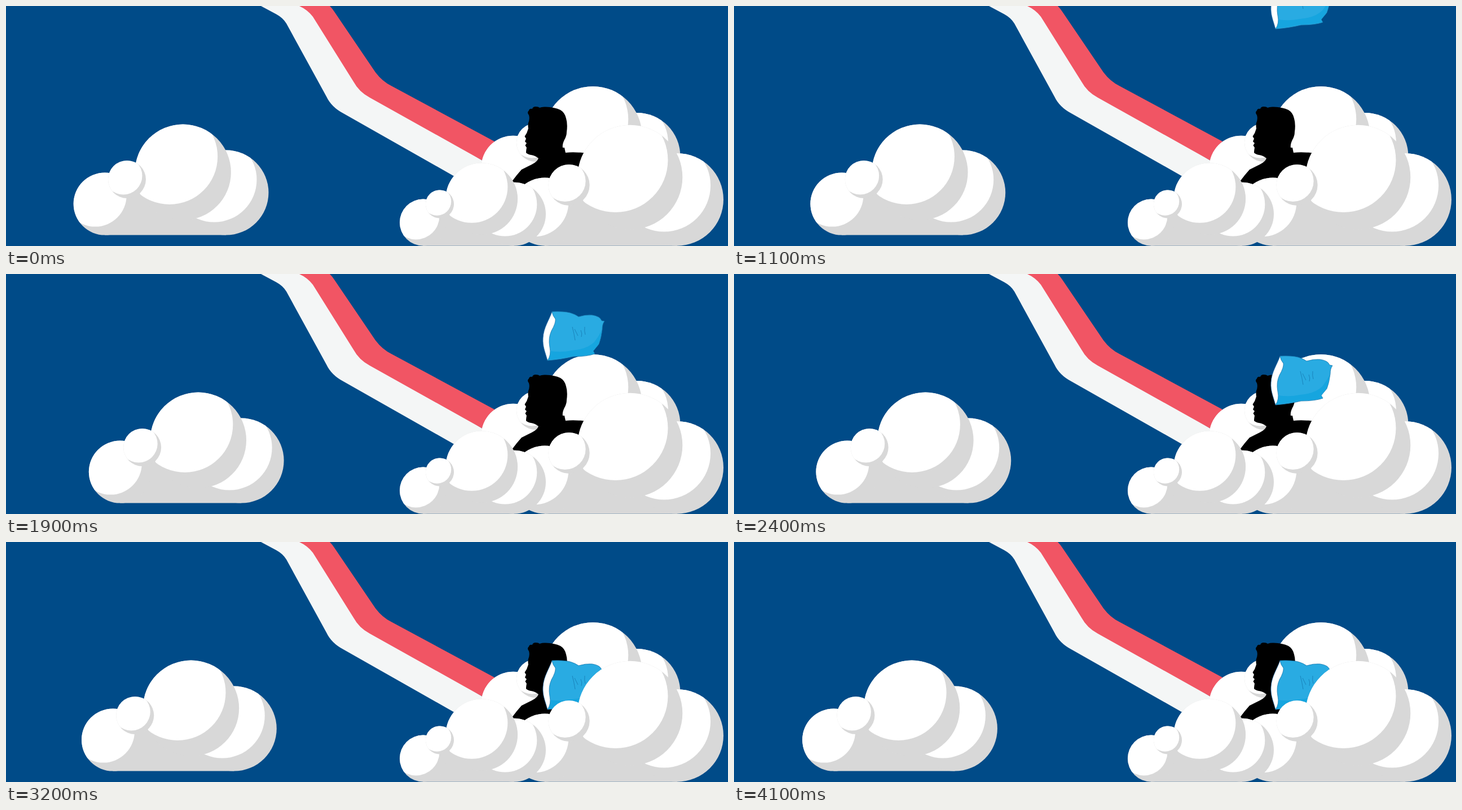
An HTML page that plays this animation: 1280 px wide and 427 px high, repeating every 4200 ms.

```html
<!DOCTYPE html>
<html lang="en">
<head>
<meta charset="utf-8">
<title>Head in the clouds</title>
<style>
  html, body { margin: 0; width: 100%; height: 100%; overflow: hidden; background: #004b88; }
  svg { display: block; width: 100%; height: 100%; }
</style>
</head>
<body>
<svg viewBox="0 0 1280 427">
  <defs id="defs">
    <g id="cloud"></g>
  </defs>

  <rect width="1280" height="427" fill="#004b88"/>

  <path fill="#f4f6f6" d="M452 0 L479 14.500 Q491 21 497 31 L568 161 Q577 180 598 191 L793 302
    L850 334 L890 300 L843 274 L640 150 L560 20 L535 0Z"/>
  <path fill="#f15564" d="M520 0 Q535 7 544 19 L616 134.500 Q626 153 645 163 L843 274
    L872 290 L892 255 L866 241 L683 142 Q667 134 655 118 L582 10 Q578 4 574 0Z"/>

  <use id="drift" href="#cloud"/>

  <use id="back" href="#cloud"/>

  <path id="man" d="M927 194 Q923 189 927 186 Q928 182 933 183 Q934 179 939 179 Q944 179 946 181
    Q950 179 957 179.500 Q973 180 983 185 Q991 190 993 200 Q996 210 994 224 Q994 231 990 238
    Q986 246 987 252 L990 252 L992 261 Q1007 259 1030 262 L1020 330 L905 330 L897 312
    Q905 301 914 291 L932 282 Q942 277 944 271 Q938 266 931 265 Q925 264 922 261
    Q922 257 923 252 L920.500 248 L923 244 L920 241 L922 236 L919.500 232 Q924 226 926 218
    Q925 212 926 208 Q929 201 927 194Z"/>

  <g id="pillow" stroke-linejoin="round">
    <path fill="#fff" stroke="#2c73ad" stroke-width=".8" d="M968 10 C963 25 953 38 952 57
      C951 72 956 82 960 97 L970 85 L980 30Z"/>
    <path fill="#29abe2" stroke="#1976ad" stroke-width=".8" d="M968 10 Q988 9 1000 12 Q1010 15 1015 19
      Q1028 15 1039 16 Q1053 18 1056 26 L1061 27 Q1057 32 1057 42 Q1055 58 1051 68
      Q1046 74 1041 80 L1044 85 Q1030 90 1005 90 Q985 95 960 97 Q967 87 964 73
      Q961 57 967 44 Q975 30 974 23 Q969 17 968 10Z"/>
    <path fill="#16a5df" d="M961 96 Q967 87 965 80 Q985 83 1003 79 Q1030 77 1043 64
      Q1051 54 1056 43 Q1054 61 1049 70 L1041 80 L1043 85 Q1025 89 1005 89 Q983 94 961 96Z"/>
    <path fill="none" stroke="#1473ab" stroke-width=".7" d="M1004 37 Q1007 48 1009 61 M1008 41 L1014 53
      M1019 43 Q1022 49 1020 55 M1026 37 Q1025 45 1027 51"/>
  </g>

  <use id="right" href="#cloud"/>
  <use id="left" href="#cloud"/>
</svg>
<script>
const LOOP = 4200, STEP = 100, DRIFT = 30;
const $ = id => document.getElementById(id);

// Puffs: centre, radius, and how far the lit disc is shifted left and up.
const puffs = [
  [390, 332.1, 75.5, 21, 23],
  [313.7, 295.8, 85.2, 23.7, 28],
  [175.2, 352.1, 55.5, 17, 15],
  [214.5, 308.5, 33.5, 6.5, 6.5]
];

const disc = (x, y, r, extra = '') => `<circle cx="${x}" cy="${y}" r="${r}" ${extra}/>`;

function buildCloud() {
  let clips = '', body = '<path fill="#d8d8d8" d="M175 322H390V407.6H175Z"/>';
  puffs.forEach(([x, y, r, dx, dy], i) => {
    clips += `<clipPath id="puff${i}">${disc(x, y, r)}</clipPath>`;
    body += disc(x, y, r, 'fill="#d8d8d8"');
    body += disc(x - dx, y - dy, r, `fill="#fff" clip-path="url(#puff${i})"`);
  });
  $('defs').insertAdjacentHTML('beforeend', clips);
  $('cloud').innerHTML = body;
}

// Puts the left side and the top of a cloud at x, y.
function place(id, x, y, scale) {
  $(id).setAttribute('transform', `translate(${x} ${y}) scale(${scale}) translate(-119.7 -210.6)`);
}

// Top of the pillow: time, y.
const fall = [[700, -102], [1500, 10], [1900, 67], [2400, 146], [2800, 211]];

function pillowTop(t) {
  const i = fall.findIndex(([time]) => time > t);
  if (i === 0) return fall[0][1];
  if (i < 0) return fall[fall.length - 1][1];
  const [t0, y0] = fall[i - 1], [t1, y1] = fall[i];
  return y0 + (y1 - y0) * (t - t0) / (t1 - t0);
}

function draw(now) {
  const t = Math.floor(now % LOOP / STEP) * STEP;
  const half = LOOP / 2;
  const shift = DRIFT * (1 - Math.abs(t - half) / half);
  $('drift').setAttribute('transform', `translate(${shift} 0)`);
  $('pillow').setAttribute('transform', `translate(0 ${pillowTop(t) - 10})`);
}

buildCloud();
place('back', 842.5, 143, 1.0205);
place('right', 894.7, 211.7, 1.091);
place('left', 698, 279.2, 0.749);

const start = performance.now();
function tick() {
  draw(performance.now() - start);
  requestAnimationFrame(tick);
}
tick();
</script>
</body>
</html>
```
